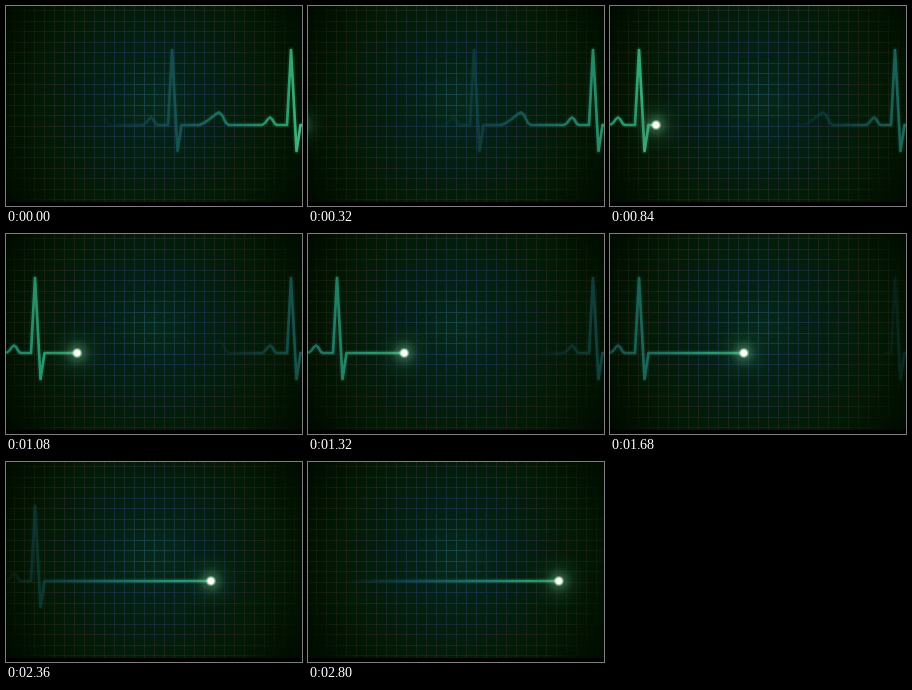
Animation, 296 px wide and 200 px high, one loop 2.84 s. Source, as an HTML page with a canvas:

```html
<!DOCTYPE html>
<html lang="en">
<head>
<meta charset="utf-8">
<title>Heart monitor</title>
<style>
  html, body { margin: 0; height: 100%; overflow: hidden; background: #000; }
  canvas { display: block; width: 296px; height: 200px; }
</style>
</head>
<body>
<canvas id="stage" width="296" height="200"></canvas>
<script>
const W = 296, H = 200, LOOP = 2840, STEP = 40;
const SPEED = 0.1045, START = -41.7, SWEEP = 345, TAIL = 212, BASE = 119;
const ctx = document.getElementById('stage').getContext('2d');

// One beat, as offsets from the tall peak
const beat = [[-29, 0], [-26, -2], [-23, -6], [-21, -7.5], [-19, -6], [-16, -1], [-14, 0],
  [-4, 0], [0, -75], [5.5, 26], [9.5, 0]];
const afterWave = [[27, 0], [32, -2], [39, -7], [44, -11], [47, -12.5], [50, -10], [54, -2], [57, 0]];
const place = (points, peak) => points.map(([x, y]) => [peak + x, BASE + y]);

const beatTrace = [47, 166, 285].flatMap(peak => place([...beat, ...afterWave], peak));
const flatTrace = [...place(beat, 29), [400, BASE]];

function radial(x, y, radius, stops) {
  const g = ctx.createRadialGradient(x, y, 0, x, y, radius);
  stops.forEach(([at, color]) => g.addColorStop(at, color));
  return g;
}

function drawScreen() {
  ctx.fillStyle = radial(150, 96, 180, [[0, '#06281a'], [0.3, '#032011'],
    [0.65, '#021a05'], [1, '#000900']]);
  ctx.fillRect(0, 0, W, H);
  ctx.fillStyle = radial(145, 92, 165, [[0, 'rgba(28,76,76,.85)'], [0.3, 'rgba(27,48,72,.8)'],
    [0.6, 'rgba(34,40,36,.75)'], [0.85, 'rgba(28,34,14,.6)'], [1, 'rgba(10,25,0,.15)']]);
  for (let x = 8; x < W; x += 10) ctx.fillRect(x, 0, 1, H);
  for (let y = 4; y < H; y += 10.5) ctx.fillRect(0, Math.round(y), W, 1);
  ctx.fillStyle = '#000';
  ctx.fillRect(0, 196, W, 4);
}

function heightAt(points, x) {
  const i = points.findIndex(p => p[0] > x);
  if (i < 1) return BASE;
  const [x0, y0] = points[i - 1], [x1, y1] = points[i];
  return y0 + (y1 - y0) * (x - x0) / (x1 - x0);
}

function drawTrace(points, head) {
  const fade = ctx.createLinearGradient(head - TAIL, 0, head, 0);
  [[0, 'rgba(15,65,75,0)'], [0.15, 'rgba(18,75,82,.45)'], [0.35, 'rgba(24,88,90,.8)'],
   [0.6, 'rgba(32,122,105,.95)'], [0.9, 'rgb(46,165,115)'], [1, 'rgb(85,210,145)'],
   [1, 'rgba(85,210,145,0)']].forEach(([at, color]) => fade.addColorStop(at, color));
  ctx.strokeStyle = fade;
  ctx.lineJoin = 'round';
  ctx.beginPath();
  points.forEach(([x, y]) => ctx.lineTo(x, y));
  for (const [width, alpha] of [[6, 0.14], [2.7, 0.95]]) {
    ctx.lineWidth = width;
    ctx.globalAlpha = alpha;
    ctx.stroke();
  }
  ctx.globalAlpha = 1;
}

function drawDot(x, y) {
  ctx.fillStyle = radial(x, y, 30, [[0, 'rgba(120,190,150,.5)'], [0.25, 'rgba(75,140,105,.4)'],
    [0.5, 'rgba(30,85,55,.2)'], [1, 'rgba(10,50,25,0)']]);
  ctx.fillRect(x - 30, y - 30, 60, 60);
  ctx.fillStyle = radial(x, y, 5.5, [[0, '#fff'], [0.5, '#fbfff0'], [1, 'rgba(190,240,200,0)']]);
  ctx.fillRect(x - 6, y - 6, 12, 12);
}

function draw(now) {
  const t = Math.floor(now % LOOP / STEP) * STEP;
  const head = START + SPEED * t;
  drawScreen();
  drawTrace(beatTrace, head + SWEEP);
  drawTrace(flatTrace, head);
  drawDot(head, heightAt(flatTrace, head));
  requestAnimationFrame(draw);
}
requestAnimationFrame(draw);
</script>
</body>
</html>
```
